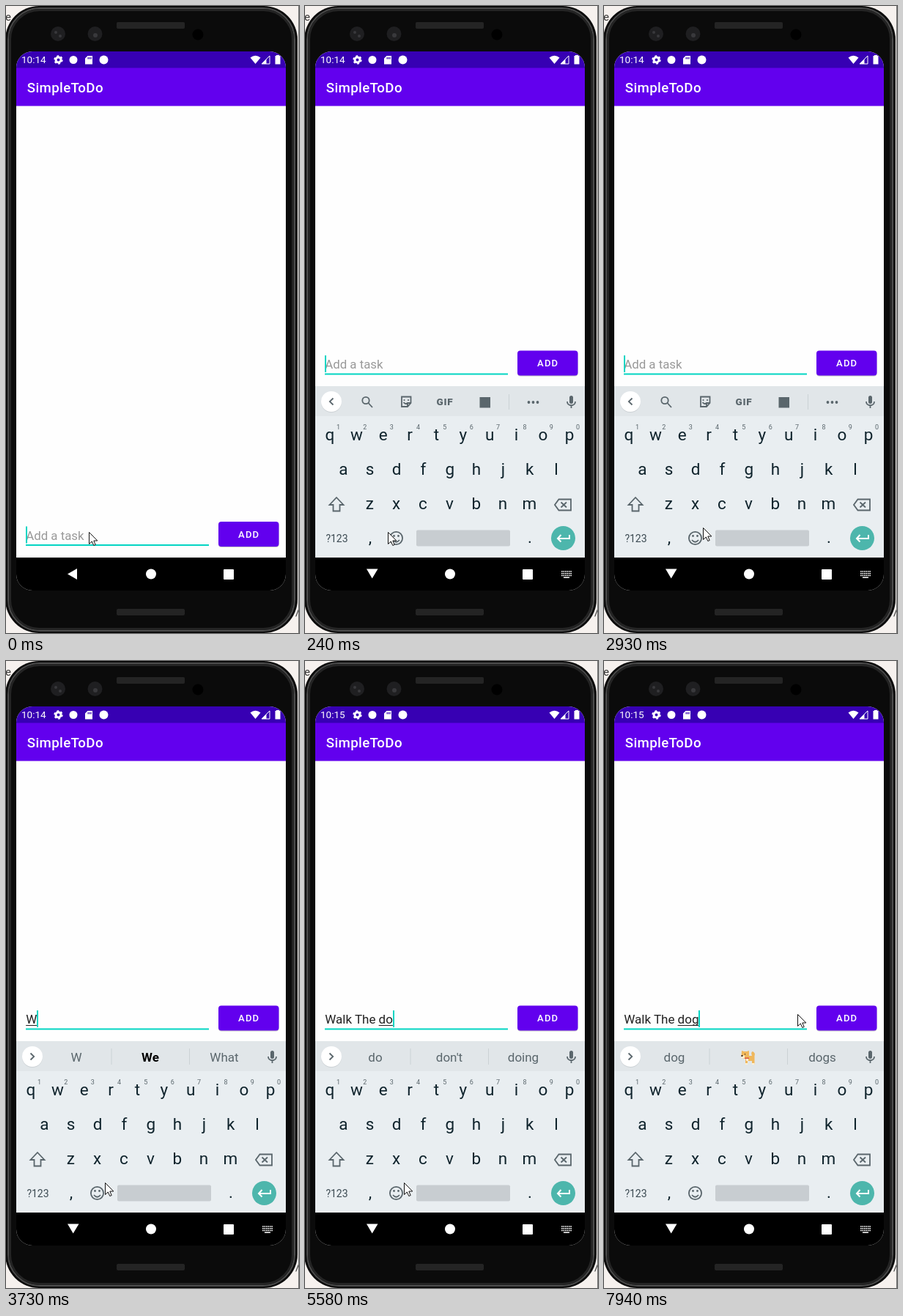
Write an HTML page that moves like this. It is 400 px wide and 856 px high and loops after 8000 ms.

```html
<!DOCTYPE html>
<html lang="en">
<head>
<meta charset="utf-8">
<title>To-do app on a phone</title>
<style>
html, body { margin: 0; width: 100%; height: 100%; overflow: hidden; background: #f6f1ee; }
svg { display: block; width: 400px; height: 856px; font-family: Roboto, sans-serif; }
text { white-space: pre; }
.mid { text-anchor: middle; }
.line { fill: none; stroke: #5a666c; stroke-width: 1.8; }
</style>
</head>
<body>
<svg viewBox="0 0 400 856">
  <defs>
    <pattern id="mesh" width="2" height="2" patternUnits="userSpaceOnUse">
      <path d="M0 0H2V2H0z" fill="#1c1c1c"/><path d="M0 0H1V1H0zM1 1H2V2H1z" fill="#2c2c2c"/>
    </pattern>
    <clipPath id="screen"><rect x="14" y="62" width="368" height="736" rx="22"/></clipPath>
    <clipPath id="imeArea"><path d="M14 519H382V753H14z"/></clipPath>
  </defs>

  <!-- phone body -->
  <g fill="#333" font-size="15"><text x="-1" y="20">e</text><text x="395" y="833">/</text></g>
  <path d="M399.500 0V856" stroke="#777"/>
  <rect x="-1" width="399" height="856" rx="46" fill="#0b0b0b"/>
  <g fill="none">
    <rect x="3" y="3" width="391" height="850" rx="43" stroke="#4c4c4c" stroke-width="2"/>
    <rect x="5.500" y="5.500" width="386" height="845" rx="40" stroke="#242424" stroke-width="3"/>
  </g>
  <g fill="url(#mesh)"><rect x="151" y="22" width="93" height="9" rx="2"/><rect x="151" y="823" width="93" height="9" rx="2"/></g>
  <g fill="#1f1f21"><circle cx="71" cy="38" r="10"/><circle cx="121.500" cy="38" r="10"/></g>
  <g fill="#39393c"><circle cx="68" cy="36" r="2"/><circle cx="74" cy="41" r="2"/><circle cx="122" cy="40" r="3"/></g>
  <circle cx="262" cy="39" r="7.500" fill="#000"/>

  <g clip-path="url(#screen)">
    <path d="M14 62H382V798H14z" fill="#fefefe"/>
    <path d="M14 62H382V85H14z" fill="#3700b3"/>
    <path d="M14 84.500H382V136.600H14z" fill="#6200ee"/>
    <path d="M14 753H382V798H14z"/>

    <!-- status bar -->
    <g fill="#fff">
      <text id="clock" x="21" y="78" font-size="13.500"></text>
      <g fill="none" stroke="#fff">
        <circle cx="71.500" cy="73.500" r="3.500" stroke-width="3"/>
        <circle cx="71.500" cy="73.500" r="5.200" stroke-width="2" stroke-dasharray="2.720"/>
      </g>
      <circle cx="92" cy="73.500" r="5.500"/>
      <path d="M111.500 68H118V79.500H108V71.500zM111.500 70V72.500H112.700V70zM113.500 70V72.500H114.700V70zM115.500 70V72.500H116.700V70z" fill-rule="evenodd"/>
      <circle cx="133.500" cy="73.500" r="6"/>
      <path d="M333.500 70.500Q340.500 65 347.500 70.500L340.500 79z"/>
      <path d="M360 68V79H349z" fill="none" stroke="#fff"/><path d="M355.500 72.500V79H349z"/>
      <path d="M369 68V67H373V68H374.500V79.500H367.500V68z"/>
      <text x="28.800" y="118" font-size="18.700" font-weight="500" letter-spacing=".35">SimpleToDo</text>
    </g>

    <!-- entry row -->
    <g id="row">
      <text id="hint" x="27.200" y="495.500" font-size="16.850" fill="#999">Add a task</text>
      <text id="typed" x="27.200" y="495.500" font-size="17" fill="#212121"></text>
      <path id="compose" stroke="#212121"/>
      <path d="M27 502H277V504H27z" fill="#03d5c3"/>
      <rect id="caret" y="477.500" width="2" height="23" fill="#03d5c3"/>
      <rect x="290" y="472" width="82.500" height="34" rx="4" fill="#000" opacity=".22"/>
      <rect x="290" y="471" width="82.500" height="34" rx="4" fill="#6200ee"/>
      <text x="317" y="492.500" font-size="13.100" font-weight="500" letter-spacing="1.170" fill="#fff">ADD</text>
    </g>

    <!-- on-screen keyboard -->
    <g clip-path="url(#imeArea)"><g id="ime">
      <path d="M14 519H382V753H14z" fill="#e9eef1"/>
      <path d="M14 519H382V560H14z" fill="#e1e6e9"/>
      <circle cx="36" cy="541" r="14" fill="#b8bec2" opacity=".5"/>
      <circle cx="36" cy="540" r="14" fill="#fff"/>
      <path id="chevron" class="line"/>
      <g fill="#5a666c">
        <rect x="361" y="532" width="5" height="11" rx="2.500"/>
        <path class="line" d="M358 540C358 547 369 547 369 540M363.500 545V549"/>
      </g>
      <g id="tools" fill="#5a666c">
        <g class="line"><circle cx="83" cy="538.500" r="4.700"/><path d="M86.500 542L92 548"/>
          <path d="M132 533.500H144.500V542L140 547H132zM134.500 541Q137 544.500 140.500 542M144 542H140V546.500"/></g>
        <circle cx="135.500" cy="538" r="1.100"/><circle cx="141" cy="538" r="1.100"/>
        <text class="mid" x="191" y="545" font-size="13.500" font-weight="900" letter-spacing=".7">GIF</text>
        <rect x="238.500" y="534" width="14.500" height="14.500"/>
        <path d="M278 530H279V551H278z" fill="#cbd1d5"/>
        <circle cx="305.500" cy="541" r="1.900"/><circle cx="311.500" cy="541" r="1.900"/><circle cx="317.500" cy="541" r="1.900"/>
      </g>
      <g id="words" font-size="17" class="mid">
        <path d="M143.500 529H144.500V551H143.500zM250 529H251V551H250z" fill="#cbd1d5"/>
        <text x="96" y="547"></text><text x="197" y="547"></text><text x="298" y="547"></text>
        <g id="dog" fill="#efb75c">
          <path d="M188 532L191 533H195L198 532V539H202Q200 534 203 533Q207 535 205.500 539V551H202V546H196V551H193V543H190L187.500 540z"/>
          <path d="M188 538.500H192V542.500H188zM194 542H197V546H194zM193 549H196V551H193zM202 549H205.500V551H202z" fill="#fff0d2"/>
          <path d="M192 541.500H198V543H192z" fill="#d75442"/><path d="M187.500 538H189.500V540H187.500zM192 536H193V537.500H192z" fill="#3b2a20"/>
        </g>
      </g>
      <g id="keys" class="mid" fill="#0f232c" font-size="22.500"></g>
      <text class="mid" x="43.500" y="731.500" font-size="14" fill="#3c4a52">?123</text>
      <g class="line">
        <path d="M43 671L52.500 681H47.500V689.500H38.500V681H33.500z"/>
        <path d="M346.500 673.500H363V688.500H346.500L341 681zM349.500 677.500L357 684.500M357 677.500L349.500 684.500"/>
        <circle cx="124.500" cy="726.500" r="8.600"/><path d="M120 729Q124.500 734.500 129 729"/>
      </g>
      <circle cx="121.500" cy="723.500" r="1.400" fill="#5a666c"/><circle cx="127.500" cy="723.500" r="1.400" fill="#5a666c"/>
      <rect x="152" y="715.500" width="128" height="22" rx="2" fill="#c8cdd1"/>
      <circle cx="352.500" cy="726.500" r="16.500" fill="#4db6ac"/>
      <path d="M361 722V727H345M349.500 722L345 727L349.500 731.500" fill="none" stroke="#fff" stroke-width="2"/>
    </g></g>

    <!-- navigation bar -->
    <g fill="#fff">
      <path id="back"/>
      <circle cx="198" cy="775.500" r="7"/><rect x="297" y="769" width="14" height="14" rx="1"/>
      <g id="imeSwitch" stroke="#fff" stroke-width="1.500">
        <path d="M350 772H364M350 774.800H364M350 777.600H364" stroke-dasharray="1.700 .760"/>
        <path d="M353 780.300H361"/>
      </g>
    </g>
  </g>
  <path id="mouse" d="M.5 .5V16.500L4.300 13L6.800 18.500L9.200 17.500L6.800 12H11.800z" fill="#fff" stroke="#111"/>
</svg>

<script>
const $ = id => document.getElementById(id);
const LOOP = 8000;

// [time, typed text, start of underlined word, suggestions]
const typing = [
  [0, '', 0, null],
  [3600, 'W', 0, ['', '', '']],
  [3730, 'W', 0, ['W', 'We', 'What']],
  [3880, 'Wa', 0, ['Wa', 'Was', 'Want']],
  [4190, 'Wal', 0, ['Wal', 'Walk', 'Wait']],
  [4340, 'Walk', 0, ['Walk', 'Walking', 'Wall']],
  [4490, 'Walk ', 5, ['way', 'thru', 'in']],
  [4770, 'Walk T', 5, ['T', 'To', 'Try']],
  [4890, 'Walk Th', 5, ['Th', 'This', 'The']],
  [5040, 'Walk The', 5, ['The', 'They', 'The']],
  [5160, 'Walk The', 5, ['The', 'They', 'This']],
  [5310, 'Walk The ', 9, ['weather', 'dog', 'other']],
  [5460, 'Walk The d', 9, ['d', 'day', 'different']],
  [5580, 'Walk The do', 9, ['do', "don't", 'doing']],
  [5980, 'Walk The dog', 9, ['dog', '', 'dogs']]
];
// [time, x, y]
const pointer = [
  [0, 113, 718], [510, 135, 712], [6590, 74, 689], [6710, 2, 656], [6860, 75, 406],
  [7010, 117, 391], [7160, 112, 420], [7280, 101, 458], [7400, 96, 484],
  [7550, 92, 484], [7670, 158, 484], [7820, 218, 485], [7940, 264, 482]
];
const caretFlips = [510, 940, 1480, 2050, 2450, 2930, 3480, 3600, 6440, 6860, 7400, 7820];

const at = (list, t) => list.findLast(step => step[0] <= t);

function addKeys(letters, x, y) {
  [...letters].forEach((key, i) => {
    const cx = x + i * 36.35;
    $('keys').innerHTML += `<text x="${cx}" y="${y}">${key}</text>` +
      (y < 600 ? `<text x="${cx + 11.5}" y="577.5" font-size="9" fill="#5a666c">${(i + 1) % 10}</text>` : '');
  });
}
addKeys('qwertyuiop', 34, 593);
addKeys('asdfghjkl', 52.3, 640);
addKeys('zxcvbnm', 88.3, 687);
addKeys(',', 89, 733);
addKeys('.', 307, 733);

const typed = $('typed');
const words = document.querySelectorAll('#words > text');
const show = (id, on) => $(id).setAttribute('display', on ? 'inline' : 'none');
const move = (id, x, y) => $(id).setAttribute('transform', `translate(${x} ${y})`);
const textWidth = n => n ? typed.getSubStringLength(0, n) : 0;

function draw(t) {
  const [, text, start, picks] = at(typing, t);
  const [, x, y] = at(pointer, t);
  const open = t >= 120;

  $('clock').textContent = t < 4190 ? '10:14' : '10:15';
  move('mouse', x, y);
  move('row', 0, open ? -.5 : 233);
  move('ime', 0, t >= 240 ? 0 : open ? 90 : 234);
  $('back').setAttribute('d', open ? 'M84 768.5H99.500L91.700 781.500z' : 'M97 768V783L84 775.500z');
  show('imeSwitch', open);

  typed.textContent = text;
  show('hint', !text);
  const left = 27.2 + textWidth(start), end = 27.2 + textWidth(text.length);
  $('compose').setAttribute('d', text.length > start ? `M${left} 498H${end}` : '');
  $('caret').setAttribute('x', Math.round(end));
  show('caret', caretFlips.filter(flip => flip <= t).length % 2 === 0);

  show('tools', !picks);
  show('words', picks);
  show('dog', t >= 5980);
  $('chevron').setAttribute('d', picks ? 'M33.500 535.500L38.200 540L33.500 544.500' : 'M38.500 535.500L33.800 540L38.500 544.500');
  words.forEach((word, i) => {
    const strong = i === 1 && picks && picks[1] === 'We';
    word.textContent = picks ? picks[i] : '';
    word.setAttribute('font-weight', strong ? 700 : 400);
    word.setAttribute('fill', strong ? '#000' : '#5a666c');
  });
}

function tick() {
  draw(performance.now() % LOOP);
  requestAnimationFrame(tick);
}
tick();
</script>
</body>
</html>
```
